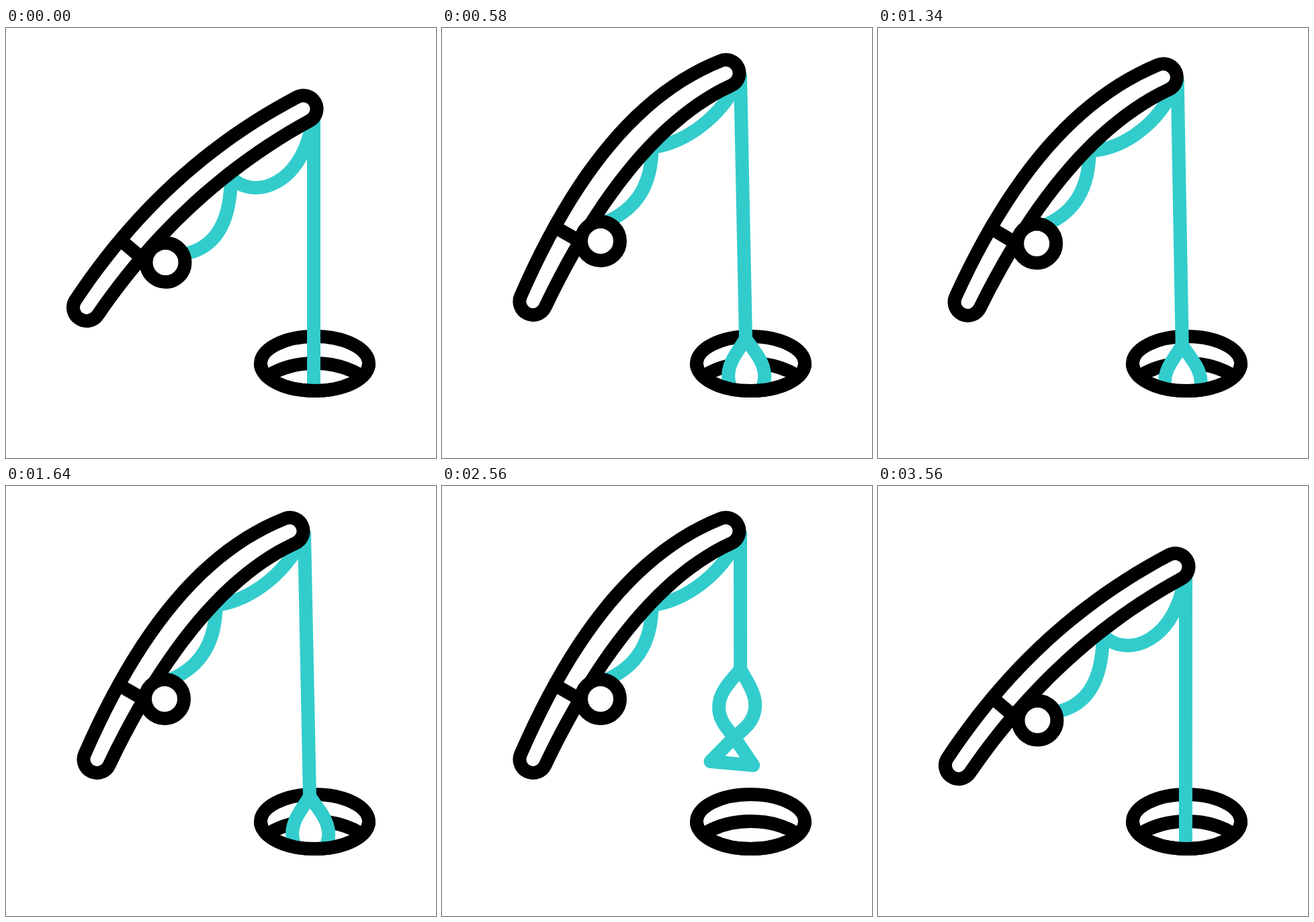
Recreate the animation shown at these times as an HTML page. Size 640 px wide and 640 px high, loop 3.6 s.

```html
<!DOCTYPE html>
<html lang="en">
<head>
<meta charset="utf-8">
<title>Ice fishing</title>
<style>
  html, body { margin: 0; width: 100%; height: 100%; overflow: hidden; background: #fff; }
  svg { display: block; width: 100vw; height: 100vh; }
  path, circle, ellipse { fill: none; stroke: #000; stroke-width: 20; }
  .teal { stroke: #33cccc; stroke-linecap: round; stroke-linejoin: round; }
  #fish, #rod, #reel { fill: #fff; }
</style>
</head>
<body>
<svg viewBox="0 0 640 640">
  <clipPath id="above">
    <path d="M0 0H640V500H540A80.5 40.5 0 0 1 379 500H0Z"/>
  </clipPath>
  <ellipse cx="459.5" cy="499.5" rx="80.5" ry="40.5"/>
  <path d="M391 517Q421 499 459.5 499T528 517"/>
  <g clip-path="url(#above)">
    <path id="fish" class="teal" d="M0 0C-12 19-27 34-27 56C-27 76-14 88 0 102L32 141H-32L0 102C14 88 27 76 27 56C27 34 12 19 0 0Z"/>
    <path id="line" class="teal"/>
  </g>
  <path d="M540 499.5A80.5 40.5 0 0 1 379 499.5"/>
  <path id="slack" class="teal"/>
  <path id="loop" class="teal"/>
  <path id="rod"/>
  <path id="bar"/>
  <circle id="reel" r="29"/>
</svg>
<script>
  const LOOP = 3600, MOVE = 370, STEPS = 24;
  const $ = id => document.getElementById(id);
  const put = (id, d) => $(id).setAttribute('d', d);
  const mix = (a, b, k) => a + (b - a) * k;
  const mixPoint = (a, b, k) => a.map((v, i) => mix(v, b[i], k));

  // Eased 0 to 1, starting at a given time
  const ramp = (t, start, length = MOVE) => {
    const s = Math.min(1, Math.max(0, (t - start) / length));
    return s < 0.5 ? 4 * s ** 3 : 1 - 4 * (1 - s) ** 3;
  };

  // Key points of the lowered and the raised rod
  const low = { butt: [120, 416], bend: [250, 223.4], tip: [442.5, 120.5], reel: [237.5, 349], hang: [458, 122] };
  const high = { butt: [135.5, 407], bend: [259, 136.3], tip: [422.5, 67], reel: [236, 317], hang: [444, 72] };
  const caught = [442.5, 231];

  // Point on the rod's bent spine, moved sideways by off
  function along({ butt, bend, tip }, s, off) {
    const a = mixPoint(butt, bend, s), b = mixPoint(bend, tip, s);
    const [x, y] = mixPoint(a, b, s);
    const dx = b[0] - a[0], dy = b[1] - a[1], len = Math.hypot(dx, dy);
    return [x - dy / len * off, y + dx / len * off];
  }

  function rodOutline(pose, bulge) {
    const side = sign => Array.from({ length: STEPS + 1 }, (_, i) => {
      const s = i / STEPS;
      return along(pose, s, sign * (20 + bulge * Math.sin(Math.PI * s)));
    });
    const upper = side(-1), lower = side(1).reverse();
    return `M${upper.join('L')}A20 20 0 0 1 ${lower.join('L')}A20 20 0 0 1 ${upper[0]}Z`;
  }

  function draw(t) {
    const drop = ramp(t, 3230);
    const lift = ramp(t, 105) - ramp(t, 542)
               + ramp(t, 1085) - ramp(t, 1622)
               + ramp(t, 2113) - drop;
    const haul = ramp(t, 2200, 560) - drop;

    const pose = {};
    for (const key in low) pose[key] = mixPoint(low[key], high[key], lift);
    const { reel: [rx, ry], hang: [hx, hy] } = pose;

    put('rod', rodOutline(pose, mix(1, 3, lift)));
    const joint = mix(0.24, 0.2, lift);
    put('bar', `M${along(pose, joint, -20)}L${along(pose, joint, 20)}`);
    $('reel').setAttribute('cx', rx);
    $('reel').setAttribute('cy', ry);

    // Loose line: reel to guide, guide to tip
    const [gx, gy] = along(pose, mix(0.66, 0.585, lift), 26);
    put('slack', `M${rx + mix(30, 9, lift)} ${ry - mix(13, 29, lift)}Q${gx} ${gy + mix(100, 82, lift)} ${gx} ${gy}`);
    put('loop', `M${gx} ${gy}C${gx + mix(30, 37, lift)} ${gy + mix(36, -3, lift)} ${hx - mix(10, 32, lift)} ${hy + mix(116, 70, lift)} ${hx} ${hy}`);

    const dip = [mix(458, 452, lift), mix(550, 462, lift)];
    const mouth = mixPoint(dip, caught, haul);
    put('line', `M${hx} ${hy}L${mouth}`);
    $('fish').setAttribute('transform', `translate(${mouth}) rotate(${mix(-1.2 * lift, 6.6, haul)})`);
  }

  function tick() {
    draw(performance.now() % LOOP);
    requestAnimationFrame(tick);
  }
  tick();
</script>
</body>
</html>
```
